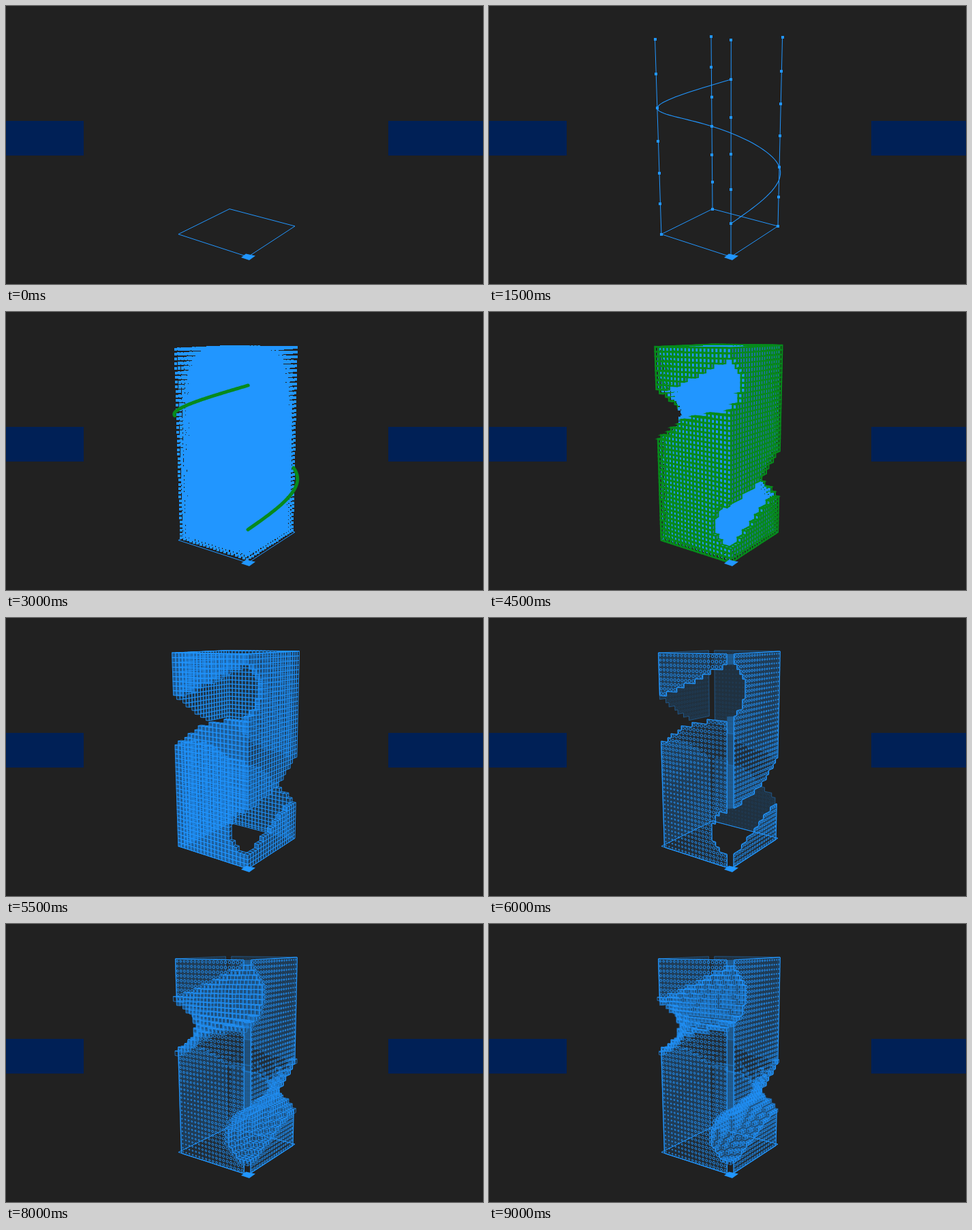
These frames come from a looping animation (700x409 px, 9.5 s). An HTML page with a canvas:

```html
<!DOCTYPE html>
<html lang="en">
<head>
<meta charset="utf-8">
<title>Voxel tower</title>
<style>
  html, body { margin: 0; width: 700px; height: 409px; overflow: hidden; background: #212121; }
  canvas { display: block; }
</style>
</head>
<body>
<canvas id="stage" width="700" height="409"></canvas>
<script>
const ctx = document.getElementById('stage').getContext('2d');
const BLUE = '#2196ff', GREEN = '#078a1c';
const blue = a => `rgba(33,150,255,${a})`;

const N = 20, M = 44;       // cells per side and per height
const TOP = 0.992;          // height of the voxel stack
const ASPECT = 2.245;       // height of the tower in side lengths
const HOLE = 0.25;          // radius carved around the curve
const STEP = 500, STEPS = 19;

// Perspective projection of the unit tower
function project(u, v, z) {
  const w = 1 + 0.15 * u + 0.111 * v - 0.096 * z;
  return [
    (355 + 132.6 * u - 74 * v - 33.8 * z) / w,
    (369 + 3.5 * u + 4 * v - 323.6 * z) / w,
    w
  ];
}
const grid = (i, j, k) => project(i / N, j / N, k * TOP / M);

// Natural cubic spline through the corners of the tower
const CORNERS = [[0, 0], [1, 0], [1, 1], [0, 1], [0, 0]];
const BEND = [[0, 0], [-15 / 14, 27 / 14], [-12 / 7, -12 / 7], [27 / 14, -15 / 14], [0, 0]];
function curve(t) {
  const s = Math.min(3, Math.floor(t)), b = t - s, a = 1 - b;
  const at = n => a * CORNERS[s][n] + b * CORNERS[s + 1][n]
    + ((a ** 3 - a) * BEND[s][n] + (b ** 3 - b) * BEND[s + 1][n]) / 6;
  return [at(0), at(1), (1 + t) / 6];
}

// Distance from each voxel to the curve
const samples = Array.from({ length: 81 }, (_, n) => [n / 20, ...curve(n / 20)]);
const voxels = [], lookup = new Map();
const key = (i, j, k) => (k * 32 + j) * 32 + i;
for (let k = 0; k < M; k++) for (let j = 0; j < N; j++) for (let i = 0; i < N; i++) {
  const u = (i + 0.5) / N, v = (j + 0.5) / N, z = (k + 0.5) * TOP / M;
  let dist = 9, t = 0;
  for (const [st, su, sv, sz] of samples) {
    const d = Math.hypot(u - su, v - sv, (z - sz) * ASPECT);
    if (d < dist) { dist = d; t = st; }
  }
  const p = project(u, v, z);
  const vox = {
    i, j, k, p, dist, t, kept: dist >= HOLE,
    front: i === 0 || j === 0,
    shell: i === 0 || j === 0 || i === N - 1 || j === N - 1
  };
  voxels.push(vox);
  lookup.set(key(i, j, k), vox);
}
const get = (i, j, k) =>
  i < 0 || j < 0 || k < 0 || i >= N || j >= N || k >= M ? null : lookup.get(key(i, j, k));
const near = (vox, d) => get(vox.i + d[0], vox.j + d[1], vox.k + d[2]);
voxels.sort((a, b) => b.p[2] - a.p[2]);

const FACING = [[-1, 0, 0], [0, -1, 0], [0, 0, 1]];
const AWAY = [[1, 0, 0], [0, 1, 0], [0, 0, -1]];

// Corners of one face of a voxel scaled about its centre
function face(vox, d, size = 1) {
  const axis = d.findIndex(n => n), a = (axis + 1) % 3, b = (axis + 2) % 3, h = size / 2;
  return [[-h, -h], [h, -h], [h, h], [-h, h]].map(([x, y]) => {
    const c = [vox.i + 0.5, vox.j + 0.5, vox.k + 0.5];
    c[axis] += d[axis] * h;
    c[a] += x;
    c[b] += y;
    return grid(...c);
  });
}

function poly(pts, fill, stroke, width = 1, closed = true) {
  ctx.beginPath();
  pts.forEach(([x, y]) => ctx.lineTo(x, y));
  if (closed) ctx.closePath();
  if (fill) { ctx.fillStyle = fill; ctx.fill(); }
  if (stroke) { ctx.strokeStyle = stroke; ctx.lineWidth = width; ctx.stroke(); }
}
function dot([x, y], size = 4) {
  ctx.fillRect(Math.round(x - size / 2), Math.round(y - size / 2), size, size);
}

function drawCurve(from, to, color, width) {
  const pts = [];
  for (let n = 0; n <= 80; n++) pts.push(project(...curve(from + (to - from) * n / 80)));
  ctx.lineCap = 'round';
  poly(pts, null, color, width, false);
  ctx.lineCap = 'butt';
}
function drawPosts(withDots) {
  for (const [u, v] of CORNERS.slice(0, 4)) {
    poly([project(u, v, 0), project(u, v, 1)], null, BLUE, 1, false);
    ctx.fillStyle = BLUE;
    if (withDots) for (let n = 0; n <= 6; n++) dot(project(u, v, n / 6));
  }
}
function drawPoints(test) {
  ctx.fillStyle = BLUE;
  for (const vox of voxels) if (test(vox)) dot(vox.p);
}
function drawGuide() {
  drawCurve(0, 1.1, GREEN, 5);
  drawCurve(2.92, 4, GREEN, 5);
}

const shell = voxels.filter(v => v.shell && v.kept);
const inShell = v => v && v.shell && v.kept;

function drawGreenBoxes(front) {
  for (const vox of shell) {
    if (vox.front !== front) continue;
    for (const d of FACING) {
      if (inShell(near(vox, d))) continue;
      poly(face(vox, d), d[1] < 0 ? 'rgba(33,33,33,.3)' : null, GREEN, d[0] < 0 ? 2.7 : 2);
    }
  }
}
function drawBlueBoxes(front) {
  for (const vox of shell) {
    if (vox.front !== front) continue;
    for (const d of AWAY) if (!inShell(near(vox, d))) poly(face(vox, d), null, blue(0.2), 0.7);
    for (const d of FACING) {
      if (inShell(near(vox, d))) continue;
      const left = d[0] < 0;
      const fill = !front ? 'rgba(28,80,130,.3)' : left ? 'rgba(30,130,225,.6)' : 'rgba(29,72,115,.5)';
      poly(face(vox, d), fill, blue(0.9), left && front ? 1.1 : 0.9);
    }
  }
}

// Perforated wall: fill, stepped outline and rings that grow near the hole
function drawWall(axis, side) {
  const layer = side ? N - 1 : 0;
  const cell = (n, k) => axis ? get(n, layer, k) : get(layer, n, k);
  const at = (n, k) => axis ? grid(n, side * N, k) : grid(side * N, n, k);
  const open = (n, k) => n < 1 || n > N - 2 || k < 0 || k >= M || !cell(n, k).kept;
  const edges = new Path2D(), body = new Path2D(), rings = new Path2D();
  const trace = (path, pts) => {
    pts.forEach(([x, y], n) => n ? path.lineTo(x, y) : path.moveTo(x, y));
  };
  for (let k = 0; k < M; k++) for (let n = 1; n < N - 1; n++) {
    if (open(n, k)) continue;
    const c = [at(n, k), at(n + 1, k), at(n + 1, k + 1), at(n, k + 1)];
    trace(body, c);
    body.closePath();
    [[0, -1], [1, 0], [0, 1], [-1, 0]].forEach(([dn, dk], e) => {
      if (open(n + dn, k + dk)) trace(edges, [c[e], c[(e + 1) % 4]]);
    });
    const r = Math.max(0.09, 0.34 - 0.3 * (cell(n, k).dist - HOLE));
    const ring = [];
    for (let a = 0; a < 8; a++) {
      const q = a * Math.PI / 4;
      ring.push(at(n + 0.5 + r * Math.cos(q), k + 0.5 + r * Math.sin(q)));
    }
    trace(rings, ring);
    rings.closePath();
  }
  ctx.fillStyle = blue(side ? 0.14 : 0.1);
  ctx.fill(body);
  ctx.lineWidth = side ? 0.8 : 1.3;
  ctx.strokeStyle = blue(side ? 0.5 : 1);
  ctx.stroke(edges);
  ctx.lineWidth = side ? 0.7 : 1;
  ctx.strokeStyle = blue(side ? 0.15 : 0.95);
  ctx.stroke(rings);
}

const rim = voxels.filter(v => v.kept && [...FACING, ...AWAY].some(d => {
  const o = near(v, d);
  return o && !o.kept;
}));

function drawTunnel() {
  for (const vox of rim) for (const d of FACING) {
    const o = near(vox, d);
    if (o && !o.kept) poly(face(vox, d), blue(0.34));
  }
}
function drawRim(size) {
  for (const vox of rim) {
    if (vox.t > 1.15 && vox.t < 2.85) continue;
    const visible = FACING.some(d => { const o = near(vox, d); return o && !o.kept; });
    if (!visible && !vox.front) continue;
    for (const d of FACING) poly(face(vox, d, size), 'rgba(30,70,110,.2)', blue(0.8), 0.8);
  }
}
function drawCorner() {
  for (let k = 8; k < M; k++) {
    if (get(0, 0, k).kept) poly([grid(0, 1, k), grid(1, 0, k), grid(1, 0, k + 1), grid(0, 1, k + 1)], blue(0.4));
  }
}
function drawPanels(size) {
  drawWall(0, 1);
  drawWall(1, 1);
  if (size) drawTunnel();
  drawCorner();
  drawWall(0, 0);
  drawWall(1, 0);
  if (size) drawRim(size);
}

function draw(step) {
  ctx.fillStyle = '#212121';
  ctx.fillRect(0, 0, 700, 409);
  ctx.fillStyle = '#002056';
  ctx.fillRect(0, 169, 114, 51);
  ctx.fillRect(561, 169, 139, 51);
  poly(CORNERS.slice(0, 4).map(([u, v]) => project(u, v, 0)), null, BLUE);

  if (step === 1 || step === 2 || step === 3) drawPosts(step > 1);
  if (step >= 3 && step <= 5) drawCurve(0, 4, BLUE, 1.1);
  if (step === 5) drawPoints(v => v.k === 0);
  if (step === 6) drawPoints(() => true);
  if (step === 7 || step === 8) drawPoints(v => v.kept);
  if (step === 6 || step === 7) drawGuide();
  if (step === 9) {
    drawGreenBoxes(false);
    drawPoints(v => v.kept);
    drawGreenBoxes(true);
  }
  if (step === 10 || step === 11) {
    drawBlueBoxes(false);
    if (step === 10) drawPoints(v => v.kept);
    drawBlueBoxes(true);
  }
  if (step >= 12) drawPanels(step > 12 ? 1.5 - 0.16 * (step - 13) : 0);

  poly([[345, 370], [352, 364.5], [366, 367.5], [357, 374]], BLUE);
}

let shown = -1;
function tick() {
  const step = Math.floor(performance.now() % (STEP * STEPS) / STEP);
  if (step !== shown) draw(shown = step);
  requestAnimationFrame(tick);
}
tick();
</script>
</body>
</html>
```
